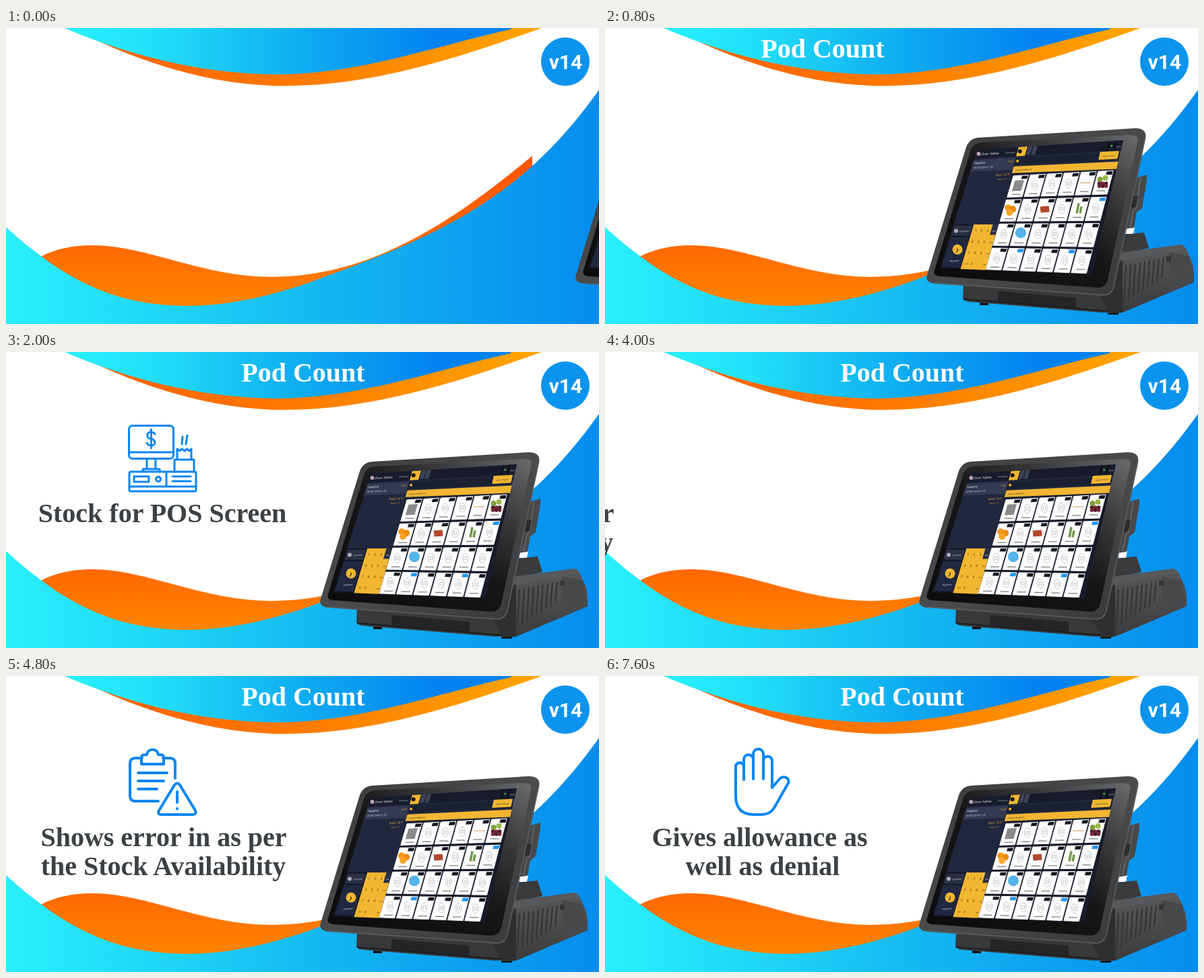
Animation of 880 by 440 pixels, one loop 8000 ms. Source, as an HTML page:

```html
<!DOCTYPE html>
<html lang="en">
<head>
<meta charset="utf-8">
<title>Point of sale banner</title>
<style>
  html, body { margin: 0; width: 100%; height: 100%; overflow: hidden; background: #fff; }
  svg { display: block; width: 880px; height: 440px; }
  .serif { font: bold 40px "Liberation Serif", serif; text-anchor: middle; }
  .copy { fill: #3b4144; }
  .icon { fill: none; stroke: #0b86f2; stroke-width: 4; stroke-linecap: round; stroke-linejoin: round; }
  .thin { stroke-width: 3; }
  .tiny { font-family: "Open Sans", sans-serif; }
</style>
</head>
<body>
<svg viewBox="0 0 880 440" xmlns="http://www.w3.org/2000/svg">
  <defs>
    <linearGradient id="sea"><stop stop-color="#28effb"/><stop offset=".2" stop-color="#22dcf7"/><stop offset=".6" stop-color="#12b0f0"/><stop offset="1" stop-color="#068cee"/></linearGradient>
    <linearGradient id="sky"><stop stop-color="#28f0fb"/><stop offset=".2" stop-color="#22dff8"/><stop offset=".55" stop-color="#0eaaf0"/><stop offset=".85" stop-color="#0280f0"/><stop offset="1" stop-color="#0284f0"/></linearGradient>
    <linearGradient id="flame" gradientUnits="userSpaceOnUse" x1="0" y1="190" x2="0" y2="414"><stop stop-color="#ff5400"/><stop offset=".6" stop-color="#ff6900"/><stop offset="1" stop-color="#ff8500"/></linearGradient>
    <linearGradient id="amber"><stop stop-color="#ff6200"/><stop offset=".4" stop-color="#ff7600"/><stop offset="1" stop-color="#ffa600"/></linearGradient>
    <linearGradient id="shell" x2="1" y2="1"><stop stop-color="#3a3b3d"/><stop offset=".5" stop-color="#4a4b4c"/><stop offset="1" stop-color="#363739"/></linearGradient>
    <linearGradient id="side" x2="0" y2="1"><stop stop-color="#58595b"/><stop offset="1" stop-color="#3a3b3d"/></linearGradient>
    <linearGradient id="glass" y1="1" x2="1" y2="0"><stop stop-color="#0b0b0c"/><stop offset=".5" stop-color="#161617"/><stop offset=".75" stop-color="#3a3a3c"/><stop offset="1" stop-color="#6a6b6d"/></linearGradient>
  </defs>
  <rect width="880" height="440" fill="#fff"/>

  <path fill="url(#amber)" d="M138 20C235 64 328 86 412 86C540 86 660 49 795 0H749L405 50Z"/>
  <path fill="url(#sky)" d="M87 0C180 40 290 69 405 69C525 69 650 23 749 2V0Z"/>
  <path fill="url(#flame)" d="M51 340C75 328 100 323 127 323C210 323 290 370 395 370C530 370 650 300 781 190V440H51Z"/>
  <path fill="url(#sea)" d="M0 296C90 378 165 413 270 413C350 413 430 387 480 367C600 324 680 286 750 231C800 192 840 148 880 92V440H0Z"/>
  <circle cx="830" cy="50" r="36" fill="#0b94ee"/>
  <text x="830.5" y="61" fill="#fff" text-anchor="middle" style="font:bold 30px Roboto,sans-serif">v14</text>

  <g id="title"><text class="serif" x="441" y="44" fill="#fff">Pod Count</text></g>

  <g id="till"></g>

  <g id="s0">
    <g class="icon thin">
      <rect x="182.500" y="109.500" width="66" height="49" rx="5"/>
      <path d="M183 149H248M209 159V173M222 159V173M203 178V174H228V178M215.500 115V143M221 122Q219 119 215 119C208 119 208 128 215 129C223 130 223 139 215 139Q210 139 209 135"/>
      <path d="M254 159V144L258 147L261 144L265 147L269 144L272 147L275 144V159M250 178V160H279V178M258 160H271M262 126L261 137M269 124L267 137"/>
      <rect x="183" y="178" width="99" height="29" rx="2"/>
      <path d="M183 200H282M190 185H212V193H190ZM238 178V200M247 185H274M247 192H274"/>
      <circle cx="226" cy="189" r="3.500"/>
    </g>
    <text class="serif copy" x="232" y="253">Stock for POS Screen</text>
  </g>

  <g id="s1">
    <g class="icon">
      <path d="M202 122H192Q184 122 184 130V178Q184 186 192 186H226M233 122H243Q251 122 251 130V152"/>
      <path d="M201 131V121Q201 117 206 117H209C210 107 225 107 226 117H229Q234 117 234 121V131Z"/>
      <path d="M196 144H239M196 156H234M196 168H224"/>
      <path d="M250 162Q254 157 258 162L281 200Q283 206 277 206H231Q224 206 227 200Z"/>
      <path d="M254 172V188M254 197V197.500"/>
    </g>
    <text class="serif copy" x="234" y="253">Shows error in as per</text>
    <text class="serif copy" x="233.500" y="296">the Stock Availability</text>
  </g>

  <g id="s2">
    <path class="icon" d="M206 154V133A6.500 6.500 0 0 0 194 133V178Q194 206 221 206H232Q245 206 251 196L272 159C275 152 265 147 259 153L248 166V126A6.500 6.500 0 0 0 235 126V153M206 133V124A7 7 0 0 1 220 124V153M220 124V116A7.500 7.500 0 0 1 235 116V128"/>
    <text class="serif copy" x="229.500" y="253">Gives allowance as</text>
    <text class="serif copy" x="234" y="296">well as denial</text>
  </g>
</svg>
<script>
const $ = id => document.getElementById(id);
const NAVY = '#21273d', GOLD = '#f2b632', INK = '#14161f';

// Bilinear map from the unit square to a quad: top left, top right, bottom right, bottom left
const plane = (a, b, c, d) => (u, v) => [0, 1].map(i =>
  (a[i] * (1 - u) + b[i] * u) * (1 - v) + (d[i] * (1 - u) + c[i] * u) * v);
const screen = plane([541, 181], [758, 167], [711, 366], [486, 357]);
const shop = plane([594, 218], [745, 210], [704, 367], [552, 361]);

const poly = (pts, fill, more = '') =>
  `<polygon points="${pts.map(p => p.map(n => n.toFixed(1))).join(' ')}" fill="${fill}" ${more}/>`;
const box = (map, u, v, w, h, fill, more) =>
  poly([map(u, v), map(u + w, v), map(u + w, v + h), map(u, v + h)], fill, more);
const dot = ([x, y], r, fill) => `<circle cx="${x}" cy="${y}" r="${r}" fill="${fill}"/>`;
const tag = (u, v, s, size, fill) => {
  const [x, y] = screen(u, v);
  return `<text class="tiny" transform="matrix(1 -.06 -.27 1 ${x} ${y})" font-size="${size}" fill="${fill}">${s}</text>`;
};
const line = (d, color, w) => `<path d="${d}" stroke="${color}" stroke-width="${w}" fill="none"/>`;

function drawCard(c, r) {
  const u = (c + .06) / 6, v = (r + .05) / 4;
  const [x, y] = shop(u + .073, v + .105), key = r * 6 + c;
  const near = (dx, dy) => [x + dx, y + dy];
  const blue = [11, 19, 22].includes(key);
  let s = box(shop, u, v, .148, .222, '#fdfdfd', 'stroke="#fdfdfd" stroke-linejoin="round"');
  s += box(shop, u + .087, v + .005, .058, .032, blue ? '#2196f3' : INK);
  s += line(`M${x - 9} ${y + 13}h13`, '#777', 1.2);
  if (key === 0) s += box(shop, u + .03, v + .05, .09, .11, '#8b8b8b');
  else if (key === 4) s += line(`M${x - 8} ${y}h16`, '#e8c9a8', 2);
  else if (key === 5) {
    s += dot(near(-4, -4), 4, '#7fa03a') + dot(near(4, -6), 4, '#9ab84c');
    for (let i = 0; i < 6; i++) s += dot(near(-5 + i % 3 * 5, 2 + (i / 3 | 0) * 4), 2.8, i % 2 ? '#7c2436' : '#4b1c2b');
  } else if (key === 6) {
    s += dot(near(-4, -3), 5, '#f49a1c') + dot(near(3, -1), 5, '#ef8a10') + dot(near(-2, 4), 5, '#f7a52b');
  } else if (key === 8) s += poly([near(-7, -4), near(6, -5), near(7, 4), near(-6, 5)], '#b4472a');
  else if (key === 10) s += line(`M${x - 3} ${y + 7}l3 -15M${x + 2} ${y + 7}l2 -10`, '#6f9a4a', 3.5);
  else if (key === 13) s += dot(near(0, -2), 8, '#55b4ea');
  else s += `<g fill="none" stroke="#b9bbc0" stroke-width=".8"><ellipse cx="${x}" cy="${y}" rx="4.500" ry="7"/><rect x="${x - 2}" y="${y - 2}" width="4" height="4"/></g>`;
  return s;
}

function drawScreen() {
  let s = box(screen, 0, 0, 1, 1, NAVY);
  s += box(screen, 0, 0, 1, .075, '#171b2b');
  s += dot(screen(.02, .035), 3, '#b9a3a8') + tag(.04, .05, 'Oren Tallow', 4.8, '#fff');
  s += tag(.205, .047, 'Wholesaler', 2.8, '#ddd');
  s += box(screen, .285, 0, .06, .075, GOLD) + dot(screen(.302, .036), 3, INK);
  s += box(screen, .35, 0, .03, .07, '#3b4157') + box(screen, .385, 0, .03, .07, '#3b4157');
  s += box(screen, .905, 0, .004, .075, '#000') + box(screen, .95, 0, .004, .075, '#000');
  s += dot(screen(.928, .035), 1.5, '#43b649') + tag(.962, .05, 'Close', 2.8, '#fff');

  s += box(screen, 0, .085, .285, .1, '#343a52');
  s += tag(.01, .122, 'Headline', 4, '#fff') + tag(.235, .122, '18.00', 3.4, GOLD);
  s += tag(.012, .162, '18.00 Units x 18', 4, '#e8e8ec');
  s += tag(.18, .232, 'Total: 18 ₹', 4.4, GOLD) + tag(.2, .265, 'Taxes: 2 ₹', 3, GOLD);

  s += box(screen, .29, .09, .705, .055, '#1b2032') + dot(screen(.305, .115), 2, GOLD);
  s += box(screen, .865, .083, .12, .05, GOLD, `stroke="${GOLD}" stroke-width="2" stroke-linejoin="round"`);
  s += tag(.885, .117, 'Select Product', 2.8, INK);
  s += box(screen, .29, .158, .71, .055, GOLD) + tag(.31, .195, 'Home Categories', 3, INK);

  // customer panel and number pad
  s += box(screen, 0, .63, .31, .37, '#10131e');
  s += box(screen, .005, .64, .125, .085, '#2b3045') + dot(screen(.03, .685), 3, '#a9adb8') + tag(.055, .695, 'Customer', 3, '#fff');
  s += box(screen, .005, .735, .125, .255, '#222840');
  s += dot(screen(.077, .84), 7.5, GOLD) + tag(.066, .858, '❯', 6, INK) + tag(.05, .945, 'Payment', 3.4, '#fff');
  s += box(screen, .135, .63, .165, .37, GOLD) + box(screen, .262, .63, .038, .085, '#2b3045');
  ['1', '2', '3', 'Qty', '4', '5', '6', 'Disc', '7', '8', '9', 'Price', '+/-', '0', '.', '⌫'].forEach((k, i) => {
    const c = i % 4, r = i / 4 | 0;
    s += tag(.153 + c * .04, .69 + r * .092, k, c < 3 ? 5 : 2.8, i === 3 ? '#fff' : '#3a2c0c');
  });

  s += box(screen, .3, .22, .7, .78, '#171b2b');
  for (let r = 0; r < 4; r++) for (let c = 0; c < 6; c++) s += drawCard(c, r);
  return s;
}

function drawTill() {
  const path = (d, fill, more = '') => `<path d="${d}" fill="${fill}" ${more}/>`;
  let s = path('M545 404h13v8h-13ZM735 418h16v8h-16Z', '#111');
  s += path('M756 296H775L773 306H754Z', '#fff');
  s += path('M738 309L789 304L796 327L742 340Z', '#3a3b3d');
  s += path('M738 336L843 322Q848 322 852 330L861 350Q864 363 863 378L757 423L735 424Z', 'url(#side)');
  s += path('M740 337L843 322L850 329L752 347Z', '#58595b');
  for (let i = 0; i < 9; i++) s += line(`M${762 + i * 7} ${353 - i * 1.5}l-3 ${56 - i * 3.2}`, '#333436', 2);
  s += path('M826 333L857 340L862 377L826 392Z', '#47484a') + path('M822 340l7 -1l0 8l-7 1Z', '#343537');
  s += path('M521 379L520 402Q521 406 530 407L725 423L757 423V345L720 360Z', '#38393b');
  s += path('M572 391L688 401V417L572 407Z', '#242527') + line('M521 403L725 420L757 421', '#1c1d1f', 2);
  s += path('M720 394L757 345V423L738 424Z', '#2e2f31');
  s += path('M770 225L793 218V227L786 268L778 274L774 297L757 299Z', '#48494b');
  s += line('M784 222L777 268L773 272L768 296', '#68696b', 1.5) + path('M771 251l9 -2l-3 17l-9 2Z', '#2b2c2e');
  s += path('M543 163L776 149Q794 149 791 165L745 384Q742 398 728 398L478 380Q463 378 467 367L525 177Q530 164 543 163Z', 'url(#shell)');
  s += line('M478 379L728 397Q741 397 744 384L790 165', '#5c5d5f', 1.5);
  s += path('M548 170L770 159Q782 159 779 170L735 374Q732 386 720 386L485 369Q475 368 478 360L532 180Q536 171 548 170Z', 'url(#glass)');
  return s + drawScreen();
}

const LOOP = 8000, STEP = 200;
// Captions: first shown, last shown, starting offset
const slides = [[1200, 4000, -402], [4000, 6800, -403], [6800, LOOP, -378]];

// Constant-speed glide from an offset to rest
const glide = (from, t, span) => from * (1 - Math.min(1, Math.max(0, t / span)));
const shift = (id, dx) => $(id).setAttribute('transform', `translate(${dx.toFixed(2)} 0)`);

function render(ms) {
  const t = Math.floor(ms % LOOP / STEP) * STEP;
  shift('till', glide(379, t, 824));
  shift('title', glide(-590, t, 1000));
  slides.forEach(([from, to, dx], i) => {
    $('s' + i).style.display = t >= from && t < to ? '' : 'none';
    shift('s' + i, glide(dx, t - from, 800));
  });
}

$('till').innerHTML = drawTill();
const start = performance.now();
function tick() {
  render(performance.now() - start);
  requestAnimationFrame(tick);
}
tick();
</script>
</body>
</html>
```
